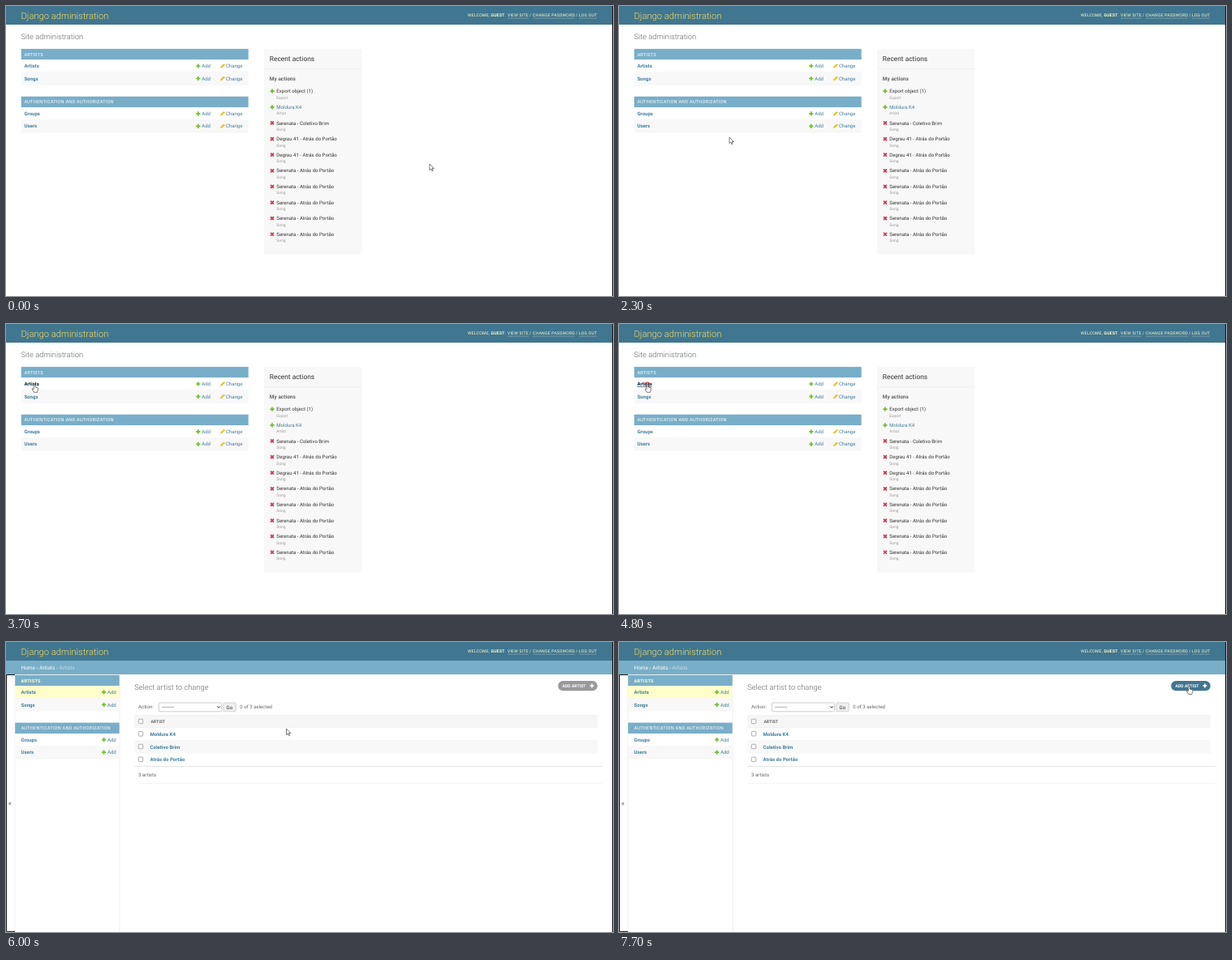
Write an HTML page that moves like this. It is 748 px wide and 358 px high and loops after 8000 ms.

```html
<!DOCTYPE html>
<html lang="en">
<head>
<meta charset="utf-8">
<title>Site administration</title>
<style>
  html, body { margin: 0; width: 100%; height: 100%; overflow: hidden; background: #fff; }
  svg { display: block; width: 100%; height: 100%; font-family: Roboto, sans-serif; }
  text { fill: #333; white-space: pre; text-rendering: geometricPrecision; }
  .title { fill: #f5dd5d; font-weight: 300; }
  .light { fill: #666; font-weight: 300; }
  .caption { fill: #fff; letter-spacing: .233px; }
  .tools { fill: #ffc; letter-spacing: .233px; }
  .cream { fill: #ffc; }
  .white { fill: #fff; }
  .quiet { fill: #999; }
  .grey { fill: #666; }
  .link { fill: #447e9b; }
  .bold { font-weight: 700; }
  .link.hover { fill: #023; }
  .focus { text-decoration: underline; }
  #pill { fill: #999; }
  #pill.hover { fill: #417690; }
</style>
</head>
<body>
<svg id="stage" viewBox="0 0 748 358"></svg>
<script>
const BLUE = '#417690', SKY = '#79aec8', STRIPE = '#f8f8f8', LINE = '#eee';
const BODY = 6.07, SMALL = 5.13, CAPTION = 5.6;

// y is the vertical middle of the capitals
const text = (x, y, string, size = BODY, cls = '', attrs = '') =>
  `<text x="${x}" y="${y + size * .36}" font-size="${size}" class="${cls}" ${attrs}>${string}</text>`;
const rect = (x, y, w, h, fill, attrs = '') =>
  `<rect x="${x}" y="${y}" width="${w}" height="${h}" fill="${fill}" ${attrs}/>`;
const stroke = (d, color, width) =>
  `<path d="${d}" fill="none" stroke="${color}" stroke-width="${width}"/>`;

const plus = (x, y, color = '#70bf2b') =>
  stroke(`M${x - 2.6} ${y}h5.2M${x} ${y - 2.6}v5.2`, color, 1.7);
const cross = (x, y) =>
  stroke(`M${x - 1.9} ${y - 2}l3.8 4m0 -4l-3.8 4`, '#d0344a', 1.7);
const pencil = (x, y) =>
  `<path d="M${x - 2.7} ${y + 2.7}l.6-2 3.2-3.2 1.5 1.5-3.2 3.2zM${x + 1.5} ${y - 1.9}l.7-.7 1.4 1.4-.7.7z" fill="#e8c020"/>`;

function header() {
  const links = [[618, 26, 'VIEW SITE'], [649, 52, 'CHANGE PASSWORD'], [706, 22, 'LOG OUT']];
  return rect(0, 0, 748, 23, BLUE) +
    text(18.5, 12, 'Django administration', 11.2, 'title') +
    text(569, 11.5, 'WELCOME,', SMALL, 'tools') +
    text(597.5, 11.5, 'GUEST', SMALL, 'tools bold') + text(614.5, 11.5, '.', SMALL, 'tools') +
    text(645, 11.5, '/', SMALL, 'tools') + text(702.2, 11.5, '/', SMALL, 'tools') +
    links.map(([x, w, label]) => text(x, 11.5, label, SMALL, 'tools') +
      rect(x, 14.8, w, .5, '#fff', 'opacity=".5"')).join('');
}

function module(x, y, width, name, rows, { inset, addX, changeX, current, id }) {
  const head = rect(x, y, width, 13.4, SKY) +
    text(x + inset, y + 6.7, name, CAPTION, 'caption' + (current ? ' cream bold' : ''));
  return head + rows.map((label, i) => {
    const top = y + 13.4 + i * 15.5, mid = top + 7.7;
    const fill = current && !i ? '#ffc' : i ? STRIPE : '#fff';
    return rect(x, top, width, 15.5, fill) + rect(x, top + 15.1, width, .5, LINE) +
      text(x + inset, mid, label, BODY, 'link bold', id ? `id="${id + label}"` : '') +
      plus(addX, mid) + text(addX + 4.4, mid, 'Add', BODY, 'link') +
      (changeX ? pencil(changeX, mid) + text(changeX + 4.2, mid, 'Change', BODY, 'link') : '');
  }).join('');
}

function dashboard() {
  const columns = { inset: 3.7, addX: 236.8, changeX: 266.7 };
  const song = 'Serenata - Atrás do Portão';
  const actions = ['Export object (1)', 'Moldura K4', 'Serenata - Coletivo Brim',
    ...Array(2).fill('Degrau 41 - Atrás do Portão'), ...Array(5).fill(song)];
  return text(18.5, 38, 'Site administration', 9.33, 'light') +
    module(18.7, 52.9, 280, 'ARTISTS', ['Artists', 'Songs'], { ...columns, id: 'home' }) +
    module(18.7, 111.7, 280, 'AUTHENTICATION AND AUTHORIZATION', ['Groups', 'Users'], columns) +
    rect(318, 53, 120.7, 253.5, STRIPE) +
    text(324.8, 65.3, 'Recent actions', 8.4) + rect(318, 77.5, 120.7, .6, '#e8e8e8') +
    text(324.8, 89.8, 'My actions', 6.5, 'bold grey') +
    actions.map((label, i) => {
      const y = 105.2 + i * 19.62;
      return (i < 2 ? plus : cross)(328, y) +
        text(333.3, y, label, BODY, i === 1 ? 'link' : '') +
        text(333.3, y + 7.7, ['Export', 'Artist'][i] || 'Song', 4.9, 'quiet');
    }).join('');
}

function artistList() {
  const columns = { inset: 7.3, addX: 120.6 };
  const checkbox = y => rect(163.3, y - 2.8, 5.5, 5.5, '#fff', 'rx=".9" stroke="#777" stroke-width=".6"');
  const artists = ['Moldura K4', 'Coletivo Brim', 'Atrás do Portão'];
  return rect(0, 23, 748, 17, SKY) +
    text(18.5, 31.5, 'Home › Artists <tspan fill="#c4dce8">› Artists</tspan>', 6.5, 'white') +
    rect(139.7, 40, .6, 318, '#e4e4e4') + rect(10.7, 40, .6, 318, '#e4e4e4') +
    stroke('M11 40.5H.5V357.4H11', '#111', 1) +
    text(2.8, 198.5, '«', 9, 'grey') +
    module(11.2, 40.8, 128.5, 'ARTISTS', ['Artists', 'Songs'], { ...columns, current: true }) +
    module(11.2, 99.6, 128.5, 'AUTHENTICATION AND AUTHORIZATION', ['Groups', 'Users'], columns) +
    text(158.2, 55.2, 'Select artist to change', 9.33, 'light') +
    rect(680.3, 48, 48.5, 12.3, '', 'rx="6.1" id="pill"').replace('fill=""', '') +
    text(685.5, 54, 'ADD ARTIST', SMALL, 'white bold') + plus(722, 54, '#fff') +
    text(163, 80.2, 'Action:', BODY, 'grey') +
    rect(188.3, 75, 77.4, 10.8, '#fff', 'rx="1.5" stroke="#aaa" stroke-width=".6"') +
    text(192, 80.2, '---------') + stroke('M260.2 79.4l1.9 1.9 1.9-1.9', '#222', 1) +
    rect(267.8, 75, 15.6, 10.8, '#efefef', 'rx="1.5" stroke="#bbb" stroke-width=".6"') +
    text(271.6, 80.6, 'Go') +
    text(288.3, 80.2, '0 of 3 selected', BODY, 'grey') +
    rect(158.3, 90.4, 570.5, 15.6, '#f6f6f6') +
    rect(158.3, 90.2, 570.5, .6, LINE) + rect(158.3, 105.6, 570.5, .6, '#e6e6e6') +
    checkbox(98) + text(178.4, 98.3, 'ARTIST', SMALL, 'bold grey') +
    artists.map((name, i) => {
      const y = 113.7 + i * 15.8;
      return rect(158.3, y - 7.8, 570.5, 15.8, i === 1 ? STRIPE : '#fff') +
        rect(158.3, y + 7.6, 570.5, .5, LINE) +
        checkbox(y - .4) + text(177.5, y, name, BODY, 'link bold');
    }).join('') +
    rect(158.3, 153.2, 577, .8, '#e2e2e2') +
    text(163, 164.2, '3 artists', BODY, 'grey') +
    rect(158.3, 174, 577, .6, LINE);
}

const outline = 'fill="#fff" stroke="#444" stroke-width=".7" stroke-linejoin="round"';
const stage = document.getElementById('stage');
stage.innerHTML = rect(0, 0, 748, 358, '#fff') + header() +
  `<g id="dashboard">${dashboard()}</g><g id="artistList">${artistList()}</g>` +
  rect(747, 0, 1, 358, '#111') +
  `<g id="pointer">
    <circle id="ring" cy=".2" fill="none" stroke="#e0202c" stroke-width="1"/>
    <path id="arrow" ${outline} d="M0 0V7.6L1.8 6 3 8.7 4.2 8.2 3.1 5.5H5.4Z"/>
    <path id="hand" ${outline} d="M-.9 6.4V.9Q-.9 0 0 0T.9.9V3.6L4 4.4Q4.6 4.6 4.5 5.4L4 8.2 3.5 10H-.5L-2.8 6.6Q-3.2 5.6-2.3 5.4Z"/>
  </g>`;
const el = id => document.getElementById(id);
const show = (id, on) => el(id).setAttribute('visibility', on ? 'visible' : 'hidden');

// Pointer path: time, x, y
const path = [
  [0, 522, 195], [100, 440, 150], [200, 330, 131], [300, 250, 165], [400, 214, 212],
  [1000, 214, 212], [1200, 207, 204], [1400, 219, 195], [1600, 215, 211], [1700, 215, 211],
  [1800, 214, 211], [2000, 214, 211], [2100, 205, 209], [2300, 136, 162], [2500, 75, 113],
  [2700, 38, 90], [2900, 40, 80], [3200, 35, 74.3], [5500, 35, 74.3],
  [5600, 70, 88], [5700, 160, 112], [5800, 260, 120], [5900, 325, 113], [6000, 345.5, 107],
  [6500, 345.5, 107], [6700, 400, 105], [7000, 560, 85], [7300, 685, 60], [7400, 698, 56],
  [7700, 702.5, 54.5], [8000, 702.5, 54.5]
];

function pointerAt(t) {
  const i = path.findIndex(p => p[0] > t);
  const [t0, x0, y0] = path[i - 1], [t1, x1, y1] = path[i];
  const k = (t - t0) / (t1 - t0);
  return [x0 + (x1 - x0) * k, y0 + (y1 - y0) * k];
}

function draw() {
  const t = Math.floor(performance.now() % 8000 / 100) * 100;
  const [x, y] = pointerAt(t);
  const within = (l, top, r, b) => x >= l && x <= r && y >= top && y <= b;
  const listOpen = t >= 4900, clicking = t >= 4500 && !listOpen;
  const onArtists = !listOpen && within(22, 70, 42, 79);
  const onSongs = !listOpen && within(22, 85, 41, 94);
  const onPill = listOpen && within(680, 48, 729, 60);
  const onSidebar = listOpen && within(18, 73, 37, 81);
  const hand = onArtists || onSongs || onPill || onSidebar;

  show('dashboard', !listOpen);
  show('artistList', listOpen);
  show('arrow', !hand);
  show('hand', hand);
  show('ring', clicking);
  el('ring').setAttribute('r', 1 + (t - 4500) / 180 * (clicking ? 1 : 0));
  el('homeArtists').classList.toggle('hover', onArtists);
  el('homeArtists').classList.toggle('focus', clicking);
  el('homeSongs').classList.toggle('hover', onSongs);
  el('pill').classList.toggle('hover', onPill);
  el('pointer').setAttribute('transform', `translate(${x} ${y})`);
  requestAnimationFrame(draw);
}
draw();
</script>
</body>
</html>
```
